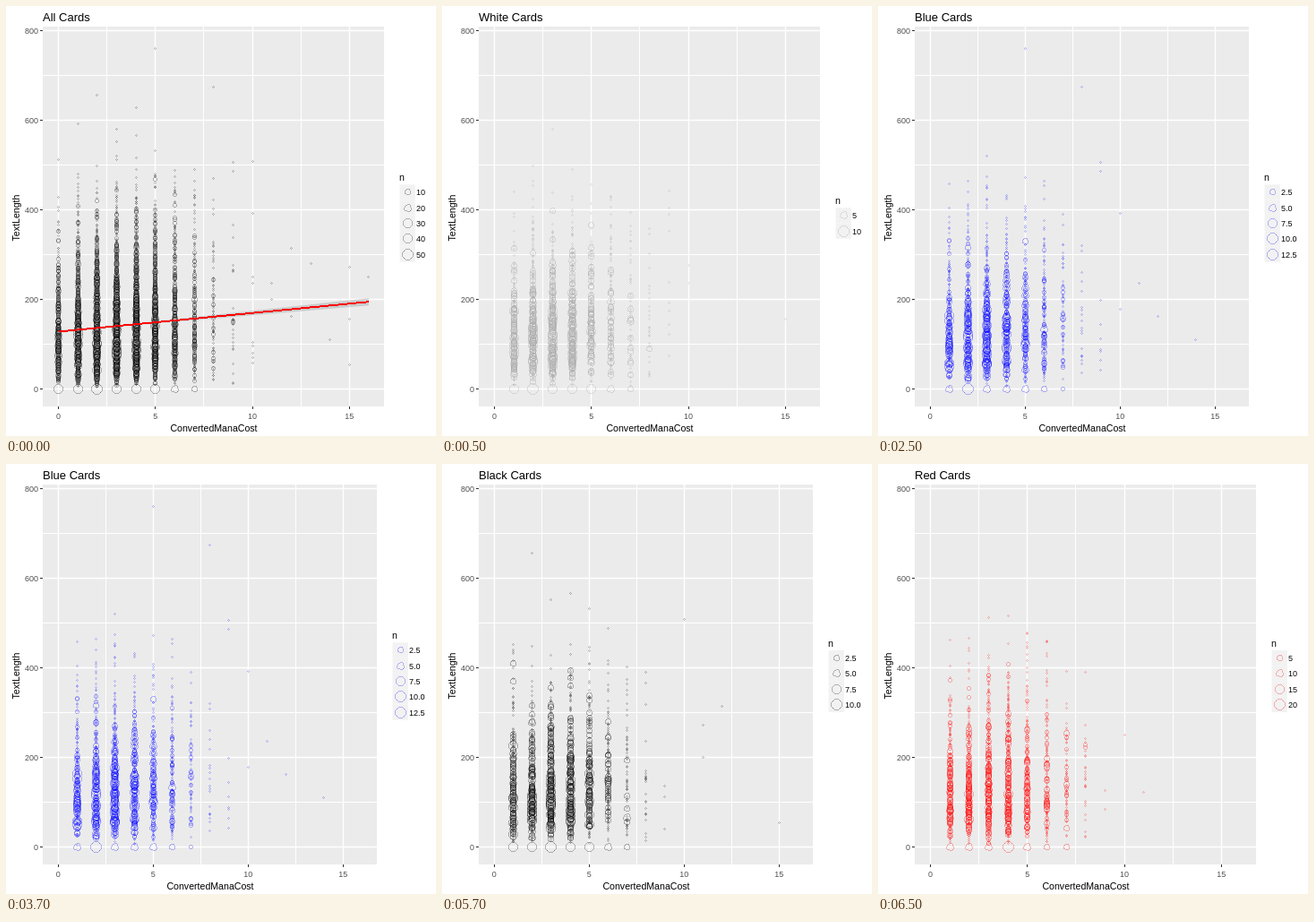
An HTML page for the animation above (8 s loop, 480 px wide and 480 px high).

```html
<!DOCTYPE html>
<html lang="en">
<head>
<meta charset="utf-8">
<title>Text length by mana cost</title>
<style>
html, body { margin: 0; width: 100%; height: 100%; overflow: hidden; background: #fff; }
svg { display: block; width: 480px; height: 480px; font-family: "Liberation Sans", Arial, sans-serif; }
.scene { opacity: 0; animation: 8s step-end infinite; }
.s0 { animation-name: all; }
.s1 { animation-name: white; }
.s2 { animation-name: blue; }
.s3 { animation-name: black; }
.s4 { animation-name: red; }
@keyframes all { 0% { opacity: 1 } 6.25%, 100% { opacity: 0 } }
@keyframes white { 0% { opacity: 0 } 6.25% { opacity: 1 } 31.25%, 100% { opacity: 0 } }
@keyframes blue { 0% { opacity: 0 } 31.25% { opacity: 1 } 56.25%, 100% { opacity: 0 } }
@keyframes black { 0% { opacity: 0 } 56.25% { opacity: 1 } 81.25%, 100% { opacity: 0 } }
@keyframes red { 0% { opacity: 0 } 81.25%, 100% { opacity: 1 } }
.title { font-size: 13px; }
.label { font-size: 10.6px; }
.key { font-size: 9px; }
.tick { font-size: 9px; fill: #4d4d4d; }
.mid { text-anchor: middle; }
.end { text-anchor: end; }
.dots { fill: none; stroke-width: .82; shape-rendering: crispEdges; }
</style>
</head>
<body>
<svg id="stage" viewBox="0 0 480 480"></svg>
<script>
const TOP = 23, BOTTOM = 447, LEFT = 41;
const py = v => 427.5 - v / 2;

// cards: size of the fullest column; max: largest count, found at zero length and cost `peak`;
// blank: usual count at zero length; far: outlying [cost, length]
const colors = [
  { title: 'White Cards', color: '#a9a9a9', alpha: .42, cards: 520, max: 12, peak: 2, blank: 8,
    right: 422, keys: [5, 10], far: [[3, 580], [2, 498], [4, 491], [10, 236], [15, 157]] },
  { title: 'Blue Cards', color: '#00f', alpha: .34, cards: 540, max: 13, peak: 2, blank: 5,
    right: 414, keys: [2.5, 5, 7.5, 10, 12.5],
    far: [[5, 760], [8, 674], [3, 520], [9, 506], [9, 487], [10, 392], [11, 236], [12, 162], [14, 110]] },
  { title: 'Black Cards', color: '#000', alpha: .34, cards: 560, max: 11, peak: 3, blank: 8,
    right: 414, keys: [2.5, 5, 7.5, 10],
    far: [[2, 657], [4, 566], [3, 552], [5, 532], [10, 508], [6, 488], [12, 314], [11, 200], [15, 54]] },
  { title: 'Red Cards', color: '#f00', alpha: .36, cards: 570, max: 23, peak: 4, blank: 9,
    right: 422, keys: [5, 10, 15, 20], far: [[4, 517], [3, 512], [5, 476], [8, 390], [10, 250]] }
];
const all = {
  title: 'All Cards', color: '#000', alpha: .34, cards: 2450, max: 54, peak: 2, blank: 34, lands: true, fit: true,
  right: 422, keys: [10, 20, 30, 40, 50],
  far: [...colors.flatMap(s => s.far), [4, 628], [1, 593], [0, 512], [7, 490], [13, 280], [15, 272], [16, 250]]
};

function random(seed) {
  return () => {
    seed = (seed + 0x6d2b79f5) | 0;
    let t = Math.imul(seed ^ (seed >>> 15), seed | 1);
    t ^= t + Math.imul(t ^ (t >>> 7), t | 61);
    return ((t ^ (t >>> 14)) >>> 0) / 4294967296;
  };
}

function poisson(rate, rnd) {
  const limit = Math.exp(-rate);
  let n = 0;
  for (let p = rnd(); p > limit; p *= rnd()) n++;
  return n;
}

const snap = v => Math.floor(v) + .5;
const radius = (n, max) => Math.floor(1.42 + 5.33 * Math.sqrt((n - 1) / (max - 1)));
const circle = (x, y, r) => `<circle cx="${snap(x)}" cy="${snap(y)}" r="${r}"/>`;
const line = (x1, y1, x2, y2, color, w) =>
  `<path d="M${x1} ${y1}L${x2} ${y2}" stroke="${color}" stroke-width="${w}"/>`;
const text = (x, y, cls, str, extra = '') => `<text x="${x}" y="${y}" class="${cls}" ${extra}>${str}</text>`;

// Card counts are bell-shaped over cost; text lengths in a column follow a gamma curve
function dots({ cards, max, peak, blank, lands, far }, px, rnd) {
  const dot = (cost, v, n) => circle(px(cost), py(v), radius(n, max));
  let out = '';
  for (let cost = lands ? 0 : 1; cost <= 11; cost++) {
    const total = cards * Math.exp(-((cost - 3) ** 2) / 8);
    const mode = 87 + 3 * cost;
    if (cost < 8) out += dot(cost, 0, cost === peak ? max : blank * Math.min(1, (8 - cost) / 3));
    for (let v = 4; v <= 480; v++) {
      const rate = total * 4 * v * v * Math.exp(-2 * v / mode) / mode ** 3;
      const uneven = -Math.log((1 - rnd()) * (1 - rnd()) * (1 - rnd())) / 3;
      const n = Math.min(poisson(rate * uneven, rnd), Math.round(max * .6));
      if (n) out += dot(cost, v, n);
    }
  }
  return out + far.map(([cost, v]) => dot(cost, v, 1)).join('');
}

function grid(right, px) {
  const across = (v, w) => line(LEFT, py(v), right, py(v), '#fff', w);
  const down = (c, w) => line(snap(px(c)), TOP, snap(px(c)), BOTTOM, '#fff', w);
  let out = `<rect x="${LEFT}" y="${TOP}" width="${right - LEFT}" height="${BOTTOM - TOP}" fill="#ebebeb"/>`;
  for (let v = 100; v < 800; v += 200) out += across(v, 1);
  for (let c = 2.5; c < 15; c += 5) out += down(c, 1);
  for (let v = 0; v <= 800; v += 200) {
    out += across(v, 1.42) + line(LEFT - 3, py(v), LEFT, py(v), '#333', 1);
    out += text(36, py(v) + 3.5, 'tick end', v);
  }
  for (let c = 0; c <= 15; c += 5) {
    const x = snap(px(c));
    out += down(c, 1.42) + line(x, BOTTOM, x, BOTTOM + 3, '#333', 1);
    out += text(px(c), 460.5, 'tick mid', c);
  }
  return out;
}

function legend({ keys, right, max, color, alpha }) {
  const size = 17.28, x = right + 26.2, first = 242.5 - (keys.length - 1) * size / 2;
  const digits = keys.some(k => k % 1) ? 1 : 0;
  let out = text(right + 17, first - 12.5, 'label', 'n');
  keys.forEach((k, i) => {
    const y = first + i * size;
    out += `<rect x="${x - size / 2}" y="${y - size / 2}" width="${size}" height="${size}" fill="#f2f2f2"/>`;
    out += `<g class="dots" stroke="${color}" stroke-opacity="${alpha}">${circle(x, y, radius(k, max))}</g>`;
    out += text(right + 36, y + 3.5, 'key', k.toFixed(digits));
  });
  return out;
}

function trend(px) {
  const a = px(0), b = px(16), m = px(3.3);
  const y = x => 363.5 - (x - a) * 33.3 / (b - a);
  return `<path d="M${a} ${y(a) - 1.6}L${m} ${y(m) - .9}L${b} ${y(b) - 4}V${y(b) + 4}L${m} ${y(m) + .9}L${a} ${y(a) + 1.6}Z"
    fill="#999" fill-opacity=".4"/><g shape-rendering="crispEdges">${line(a, y(a), b, y(b), '#f00', 2)}</g>`;
}

function scene(s, i) {
  // 0 to 16 fills the panel with 5% to spare on both sides
  const unit = (s.right - LEFT) / 17.6;
  const px = c => LEFT + .3 + (c + .8) * unit;
  return `<g class="scene s${i}">` + grid(s.right, px)
    + `<g class="dots" stroke="${s.color}" stroke-opacity="${s.alpha}">${dots(s, px, random(41 + i * 17))}</g>`
    + (s.fit ? trend(px) : '')
    + text(LEFT, 17, 'title', s.title)
    + text((LEFT + s.right) / 2 + .5, 475, 'label mid', 'ConvertedManaCost')
    + text(0, 0, 'label mid', 'TextLength', 'transform="translate(14.8 236.5) rotate(-90)"')
    + legend(s) + '</g>';
}

document.getElementById('stage').innerHTML = [all, ...colors].map(scene).join('');
</script>
</body>
</html>
```
